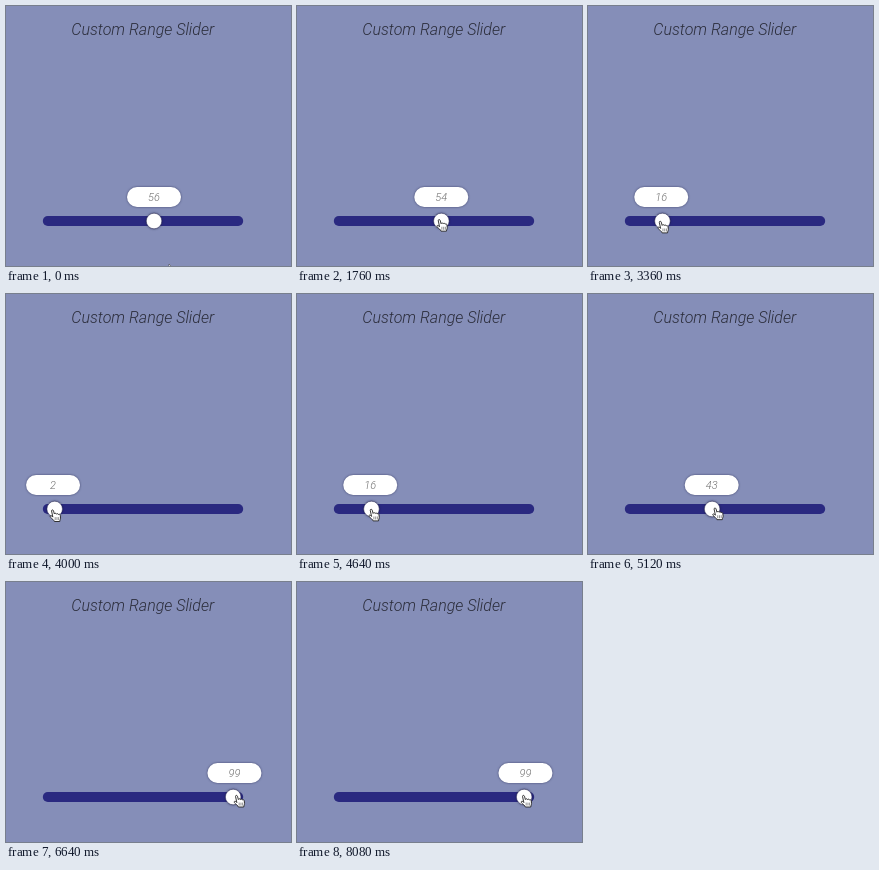
Animation, 285 px wide and 260 px high, one loop 8.16 s. Source, as an HTML page:

```html
<!DOCTYPE html>
<html lang="en">
<head>
<meta charset="utf-8">
<title>Custom Range Slider</title>
<style>
  html, body { margin: 0; width: 100%; height: 100%; overflow: hidden; background: #858eb8; }
  svg { display: block; width: 100vw; height: 100vh; }
  text { font-family: Roboto, sans-serif; font-style: italic; font-weight: 300; text-anchor: middle; }
  #bubble rect, #thumb { filter: drop-shadow(0 .4px .8px rgba(20, 22, 60, .6)); }
</style>
</head>
<body>
<svg viewBox="0 0 285 260">
  <rect width="285" height="260" fill="#858eb8"/>
  <text x="136.8" y="29" font-size="16" fill="#2c2e3c">Custom Range Slider</text>
  <rect x="36.8" y="210" width="200.4" height="10" rx="5" fill="#2a2980"/>
  <g id="bubble">
    <rect x="-27" y="181" width="54" height="20" rx="10" fill="#fff"/>
    <text id="label" y="195" font-size="11" fill="#707070"></text>
  </g>
  <circle id="thumb" cy="215" r="7.8" fill="#fff" stroke="#25244f" stroke-width=".5"/>
  <path id="arrow" d="M0 0V10.5L2.5 8.3L4.2 12L6 11.2L4.4 7.6H7.6Z" fill="#fff" stroke="#333" stroke-width=".5"/>
  <g id="hand" fill="#fff" stroke="#222" stroke-width=".9" stroke-linejoin="round" stroke-linecap="round">
    <path d="M-2.2 7.2L-3.4 1.5C-3.6 .2 -1.9 -.1 -1.5 1.2L-.6 4.5C-.3 3.5 1.2 3.5 1.5 4.6C2 3.8 3.2 4 3.5 5C4.2 4.4 5.2 4.8 5.3 5.8L5.6 8.5C5.6 9.7 4.9 10.3 4.8 12H-.6C-1 10.4 -3.2 9.2 -4.6 7.6C-5.3 6.6 -4.2 5.8 -3.3 6.4Z"/>
    <path d="M.2 8V10.2M2 8V10.2M3.7 8V10.2" stroke-width=".5"/>
  </g>
</svg>
<script>
const LOOP = 8160, STEP = 80;
const [bubble, label, thumb, arrow, hand] =
  ['bubble', 'label', 'thumb', 'arrow', 'hand'].map(id => document.getElementById(id));

// [time, value]: drag left, pause, drag right
const drag = [[1200, 56], [1760, 54], [2720, 37], [4000, 2], [4200, 2], [5120, 43], [6000, 84], [6560, 99]];

const ramp = (t, from, to) => Math.min(1, Math.max(0, (t - from) / (to - from)));
const ease = u => u * u * (3 - 2 * u);

// monotone cubic through the keys, held at both ends
function sample(keys, time) {
  const last = keys.length - 1;
  const t = Math.min(keys[last][0], Math.max(keys[0][0], time));
  const i = Math.max(0, keys.findIndex(key => key[0] >= t) - 1);
  const slope = k => k < 0 || k >= last ? 0 : (keys[k + 1][1] - keys[k][1]) / (keys[k + 1][0] - keys[k][0]);
  const tangent = k => {
    const a = slope(k - 1), b = slope(k);
    return a * b <= 0 ? 0 : 2 * a * b / (a + b);
  };
  const [[t0, v0], [t1, v1]] = [keys[i], keys[i + 1]];
  const h = t1 - t0, u = (t - t0) / h;
  return v0 + (v1 - v0) * ease(u) + h * u * (1 - u) * ((1 - u) * tangent(i) - u * tangent(i + 1));
}

const place = (node, x, y) => node.setAttribute('transform', `translate(${x} ${y})`);
const show = (node, on) => node.setAttribute('visibility', on ? 'visible' : 'hidden');

function draw(time) {
  const t = Math.floor(time % LOOP / STEP) * STEP;
  const value = Math.round(sample(drag, t));
  const thumbX = 45 + 1.84 * value;

  label.textContent = value;
  place(bubble, 43.3 + 1.87 * value, 0);
  thumb.setAttribute('cx', thumbX);

  const enter = ease(ramp(t, 0, 400));
  place(arrow, 163 - 18 * enter, 258 - 46 * enter);

  // the hand runs ahead on the way right, then drifts back
  const lead = 5.5 * ease(ramp(t, 4200, 5300)) - 4 * ease(ramp(t, 6800, 7440));
  place(hand, thumbX + .3 + lead, Math.max(213, 215.6 - .045 * value));

  const over = t >= 240;
  show(arrow, !over);
  show(hand, over);
}

const start = performance.now();
function tick() {
  draw(performance.now() - start);
  requestAnimationFrame(tick);
}
tick();
</script>
</body>
</html>
```
